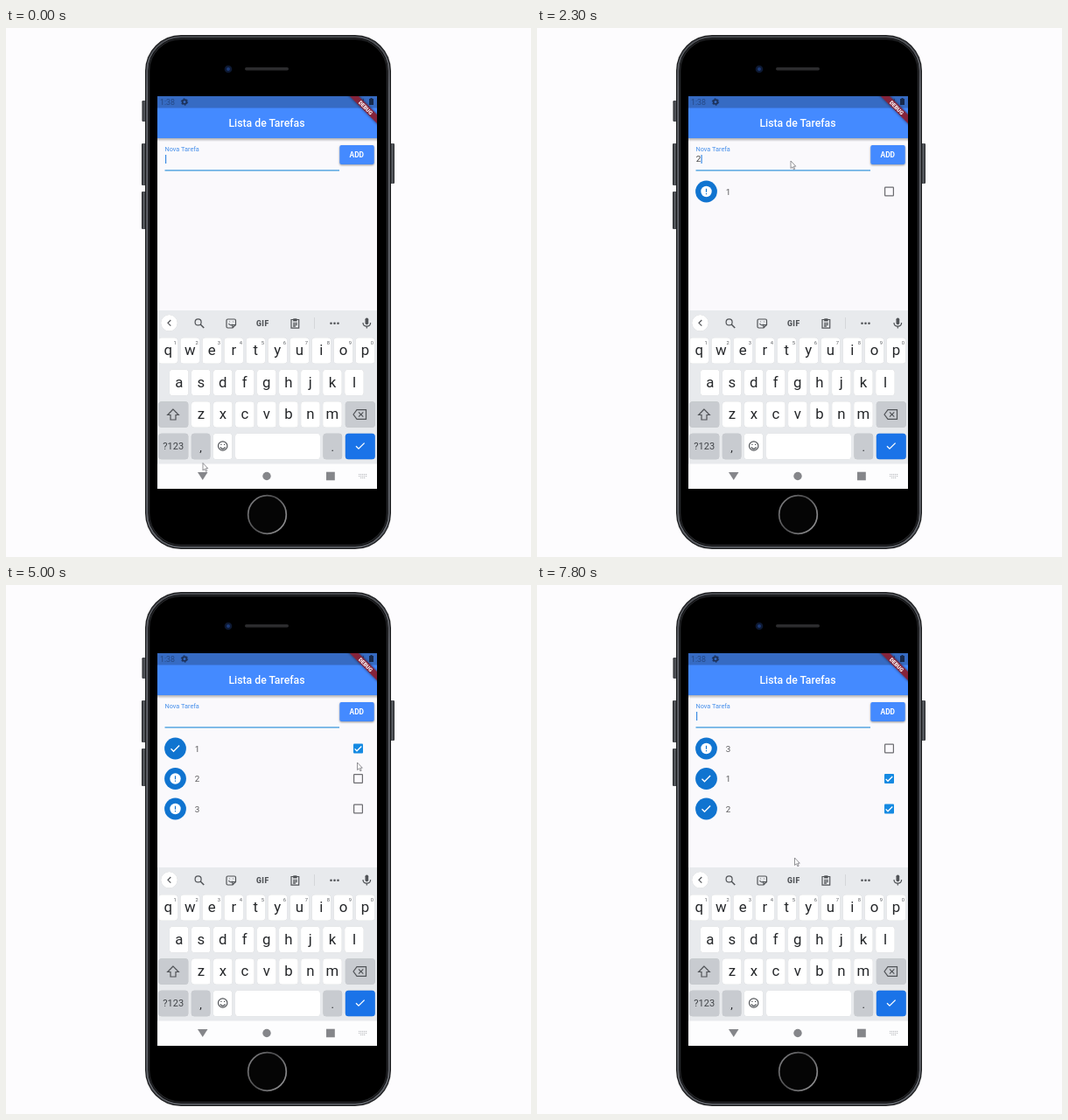
An HTML page that plays this animation: 600 px wide and 605 px high, repeating every 8 s.

```html
<!DOCTYPE html>
<html lang="pt">
<head>
<meta charset="utf-8">
<title>Lista de Tarefas</title>
<style>
html, body { margin: 0; width: 100%; height: 100%; overflow: hidden; background: #fdfcfe; }
svg { display: block; width: 600px; height: 605px; font-family: Roboto, sans-serif; }
.mid { text-anchor: middle; }
.ink { fill: none; stroke: #505357; stroke-width: 1.2; }
.key { filter: drop-shadow(0 .7px .4px #0003); }
</style>
</head>
<body>
<svg viewBox="0 0 600 605">
  <defs>
    <linearGradient id="rim" x2="0" y2="1">
      <stop offset="0" stop-color="#4c4e53"/><stop offset=".1" stop-color="#686b72"/>
      <stop offset=".9" stop-color="#686b72"/><stop offset="1" stop-color="#5a5d63"/>
    </linearGradient>
    <linearGradient id="side">
      <stop offset="0" stop-color="#1d1e20"/><stop offset=".5" stop-color="#5c5f65"/><stop offset="1" stop-color="#232427"/>
    </linearGradient>
    <linearGradient id="ring" x2="1" y2=".6">
      <stop offset="0" stop-color="#8a8a8c"/><stop offset=".5" stop-color="#4c4c4e"/><stop offset="1" stop-color="#8a8a8c"/>
    </linearGradient>
    <linearGradient id="shade" x2="0" y2="1">
      <stop offset="0" stop-color="#000" stop-opacity=".3"/><stop offset="1" stop-color="#000" stop-opacity="0"/>
    </linearGradient>
    <clipPath id="screen"><path d="M173 78h251v449H173z"/></clipPath>
    <clipPath id="list"><path d="M173 164h251v159H173z"/></clipPath>
    <path id="tick" d="M-5 .2l3 3 6.600-6.600" fill="none" stroke="#fff"/>
  </defs>
  <rect width="600" height="605" fill="#fdfcfe"/>

  <g fill="url(#side)">
    <rect x="155.500" y="83" width="5" height="24" rx="1.200"/>
    <rect x="155" y="132" width="5" height="48" rx="1.200"/>
    <rect x="155" y="187" width="5" height="43" rx="1.200"/>
    <rect x="439" y="132" width="5" height="46" rx="1.200"/>
  </g>
  <rect x="159" y="8" width="281" height="588" rx="41" fill="#1b1c1e"/>
  <rect x="161.300" y="10.300" width="276.400" height="583.400" rx="38.700" fill="#000" stroke="url(#rim)" stroke-width="2"/>
  <rect x="163.600" y="12.600" width="271.800" height="578.800" rx="36.400" fill="#000" stroke="#242528" stroke-width="1.400"/>
  <circle cx="254" cy="47" r="4.300" fill="#0d1933"/><circle cx="254" cy="47" r="2" fill="#1c3a78"/>
  <rect x="273" y="45" width="50" height="3.500" rx="1.700" fill="#2c2c2e"/>
  <circle cx="298.500" cy="556.500" r="21.800" fill="#050505" stroke="url(#ring)" stroke-width="1.700"/>

  <g clip-path="url(#screen)">
    <path d="M173 78h251v449H173z" fill="#faf9fc"/>
    <path d="M173 126h251v4H173z" fill="url(#shade)"/>
    <path d="M173 91h251v35H173z" fill="#448aff"/>
    <path d="M173 78h251v13.500H173z" fill="#366bc3"/>
    <text x="176" y="87.800" font-size="8.800" fill="#254885">1:38</text>
    <g fill="none" stroke="#1c3159">
      <circle cx="204" cy="84.500" r="2.400" stroke-width="1.800"/>
      <circle cx="204" cy="84.500" r="3.700" stroke-width="1" stroke-dasharray="1.900 1.975"/>
    </g>
    <path d="M402 87.500l7-7v7z" fill="#27477f"/>
    <path d="M415 81h1.500v-1h2v1h1.500v7h-5z" fill="#17294c"/>
    <text class="mid" x="298" y="113.200" font-size="12.240" font-weight="500" fill="#fff">Lista de Tarefas</text>
    <g transform="translate(424 78) rotate(45)">
      <rect x="-26" y="14.800" width="52" height="7.300" fill="#85233a" style="filter:drop-shadow(0 0 1.500px #0008)"/>
      <text class="mid" y="20.700" font-size="6.200" font-weight="900" fill="#fff">DEBUG</text>
    </g>

    <text x="181.500" y="141" font-size="7.340" fill="#448eea">Nova Tarefa</text>
    <text id="field" x="181.700" y="153.400" font-size="9.800" fill="#444"></text>
    <rect id="caret" y="145" width="1.200" height="10" fill="#3c8ce4"/>
    <path d="M181.500 162.900H381" stroke="#3897dc" stroke-width="1.300"/>
    <rect x="381.300" y="134" width="39.400" height="22" rx="2" fill="#448aff" style="filter:drop-shadow(0 1px 1px #0006)"/>
    <text class="mid" x="400.800" y="148.100" font-size="8.400" font-weight="700" fill="#fff">ADD</text>

    <g id="rows"></g>
    <g clip-path="url(#list)">
      <g id="spin">
        <circle r="12.300" fill="#fff" style="filter:drop-shadow(0 1px 1px #0005)"/>
        <circle id="arc" r="5.200" fill="none" stroke="#2196f3" stroke-width="1.500"/>
      </g>
    </g>

    <path d="M173 323h251v176H173z" fill="#e8eaed"/>
    <path d="M173 498.500h251V527H173z" fill="#fdfdfe"/>
    <circle class="key" cx="186.500" cy="337.300" r="9.300" fill="#fff"/>
    <g class="ink">
      <path d="M188.300 334l-3.300 3.300 3.300 3.300"/>
      <circle cx="219.600" cy="336.400" r="3.500"/><path d="M222.200 339l4 4" stroke-width="1.500"/>
      <path d="M253.500 333h7.500q1.500 0 1.500 1.500v5l-3.500 3.500h-5.500q-1.500 0-1.500-1.500v-7q0-1.500 1.500-1.500zM262.500 339.500h-3.500v3.500M254.500 338q2 3 4.500 1M255 335.800h.5M259 335.800h.5"/>
      <path d="M326 333.500h8.700v9.700H326zM328 335h4.700M328 337.700h5M328 339.500h5M328 341.200h3"/>
      <path d="M408 337q0 4.200 4.300 4.200t4.300-4.200M412.300 341v2.500"/>
    </g>
    <g fill="#505357">
      <path d="M328.300 332.300h4.100v2.700h-4.100z"/>
      <rect x="410.500" y="331.500" width="3.700" height="7.700" rx="1.850"/>
      <circle cx="371.500" cy="337.700" r="1.300"/><circle cx="375.500" cy="337.700" r="1.300"/><circle cx="379.500" cy="337.700" r="1.300"/>
      <text class="mid" x="293.300" y="340.700" font-size="8.600" font-weight="900" letter-spacing=".5">GIF</text>
    </g>
    <path d="M352.500 331v13" stroke="#d4d6da"/>
    <g id="keys"></g>
    <g class="ink">
      <path d="M191 436l-6.300 6.500h3.300v5.500h6v-5.500h3.300z"/>
      <path d="M397 442l4-5.300h10.500v10.600H401zM403 439.300l5.300 5.400M408.300 439.300l-5.300 5.400"/>
      <circle cx="247.700" cy="478" r="5.200"/><path d="M244.800 479.500q2.900 3.600 5.800 0M245.300 476.300h1.200M249 476.300h1.200"/>
    </g>
    <use href="#tick" x="405" y="478" stroke-width="1.300"/>
    <g fill="#85868a">
      <path d="M219 508h11.500l-5.750 9z"/><circle cx="298" cy="512.500" r="4.700"/>
      <path d="M366 507.700h9.800v9.600H366z"/>
    </g>
    <path d="M403 510.500h10M403 512.500h10M405 514.500h6" stroke="#b4b5b9" stroke-width=".9" stroke-dasharray="1.300 .7"/>
    
  </g>
  <path id="mouse" d="M0 0v8.500l2-1.700 1.400 3 1.300-.6-1.400-3h2.500z" fill="#fff" stroke="#77777c" stroke-width=".8"/>
</svg>
<script>
const $ = id => document.getElementById(id);

// Keyboard
const key = (x, y, w, fill = '#fff') =>
  `<rect class="key" x="${x}" y="${y}" width="${w}" height="29.5" rx="3.5" fill="${fill}"/>`;
const label = (s, x, y, size, fill = '#25272a') =>
  `<text class="mid" x="${x}" y="${y}" font-size="${size}" fill="${fill}">${s}</text>`;
let html = '';
[['qwertyuiop', 185.2], ['asdfghjkl', 197.7], ['zxcvbnm', 222.8]].forEach(([letters, x0], r) => {
  [...letters].forEach((c, i) => {
    const x = x0 + i * 25.03, y = 354.3 + r * 36.5;
    html += key(x - 10.8, y, 21.6) + label(c, x, y + 19.9, 16.8);
    if (!r) html += label((i + 1) % 10, x + 8, y + 7.5, 5.8, '#5c5f63');
  });
});
const grey = '#c8cbd0';
html += key(174.3, 427.3, 34, grey) + key(387.8, 427.3, 34, grey)
  + key(174.3, 463.8, 34, grey) + key(211.8, 463.8, 21.6, grey) + key(236.8, 463.8, 21.6)
  + key(262, 463.8, 97) + key(362.5, 463.8, 21.6, grey) + key(387.8, 463.8, 34, '#1a73e8')
  + label('?123', 191.2, 482.3, 11, '#404347') + label(',', 222.6, 483.8, 13) + label('.', 373.3, 483.8, 13);
$('keys').innerHTML = html;

// Task rows
const row = ({ n, done }, i) => `<g transform="translate(0 ${187 + i * 34.5})">
  <circle cx="193.5" r="12.4" fill="#1074d0"/>
  ${done ? '<use href="#tick" x="193.5" stroke-width="1.4"/>'
    : '<circle cx="193.5" r="6.2" fill="#fff"/><path d="M193.5-3.2v4M193.5 2v1.3" stroke="#1074d0" stroke-width="1.2"/>'}
  <text x="215.7" y="3.500" font-size="9.8" fill="#5a5a5c">${n}</text>
  ${done ? '<rect x="397" y="-5.500" width="11" height="11" rx="1" fill="#148ae2"/><use href="#tick" transform="translate(402.6 .2) scale(.8)" stroke-width="1.6"/>'
    : '<rect x="397.6" y="-4.900" width="9.8" height="9.8" rx=".6" fill="none" stroke="#6c6c70" stroke-width="1.2"/>'}
</g>`;

const LOOP = 8000, SORT = 7700;
const added = [1900, 2800, 4100], checked = [4700, 5400, Infinity];
const typed = [1300, 2200, 3400];
// Pointer stops: time, x, y
const stops = [
  [0, 225, 497.5], [100, 225, 497.5], [1000, 221.5, 150.5], [1400, 221.5, 150.5], [1800, 400, 147],
  [1900, 400, 147], [2300, 290, 152], [2400, 290, 152], [2700, 400, 147], [2900, 400, 147],
  [3200, 310, 151], [3400, 310, 151], [3800, 400, 147.5], [4100, 400, 147.5],
  [4600, 401.5, 185], [4800, 401.5, 185], [5000, 401.5, 203], [5200, 401.5, 219], [5500, 401.5, 219],
  [6100, 285, 225], [6200, 285, 225], [6600, 294.5, 312], [8000, 294.5, 312]
];
const ease = p => p * p * (3 - 2 * p);
const clamp = p => Math.max(0, Math.min(1, p));

function pointer(t) {
  const i = stops.findIndex(s => s[0] > t);
  const [t0, x0, y0] = stops[i - 1], [t1, x1, y1] = stops[i];
  const p = ease((t - t0) / (t1 - t0));
  return `translate(${x0 + (x1 - x0) * p} ${y0 + (y1 - y0) * p})`;
}

function refresh(t) {
  const pull = ease(clamp((t - 6200) / 400));
  const size = 1 - clamp((t - SORT + 100) / 200);
  const show = t > 6200 && size > 0;
  $('spin').style.display = show ? '' : 'none';
  if (!show) return;
  $('spin').setAttribute('transform', `translate(298 ${151 + 50 * pull}) scale(${size})`);
  const turn = Math.max(0, t - 6600);
  const len = turn ? 14 + 10 * Math.sin(turn / 212) : 24 * pull;
  $('arc').setAttribute('stroke-dasharray', `${len} 40`);
  $('arc').setAttribute('transform', `rotate(${turn * .42 - 90})`);
}

let shown = '';
function draw(now) {
  const t = Math.floor(now % LOOP / 100) * 100;
  const k = typed.findIndex((s, i) => t >= s && t < added[i]);
  $('field').textContent = k < 0 ? '' : k + 1;
  $('caret').setAttribute('x', k < 0 ? 182 : 187.5);
  const lit = (t + 350) % 1150 < 575;
  $('caret').style.display = k >= 0 || lit ? '' : 'none';

  const tasks = [1, 2, 3].filter(n => t >= added[n - 1]).map(n => ({ n, done: t >= checked[n - 1] }));
  if (t >= SORT) tasks.sort((a, b) => a.done - b.done);
  const rows = tasks.map(row).join('');
  if (rows !== shown) $('rows').innerHTML = shown = rows;

  refresh(t);
  $('mouse').setAttribute('transform', pointer(t));
}
const start = performance.now();
function loop() {
  draw(performance.now() - start);
  requestAnimationFrame(loop);
}
loop();
</script>
</body>
</html>
```
